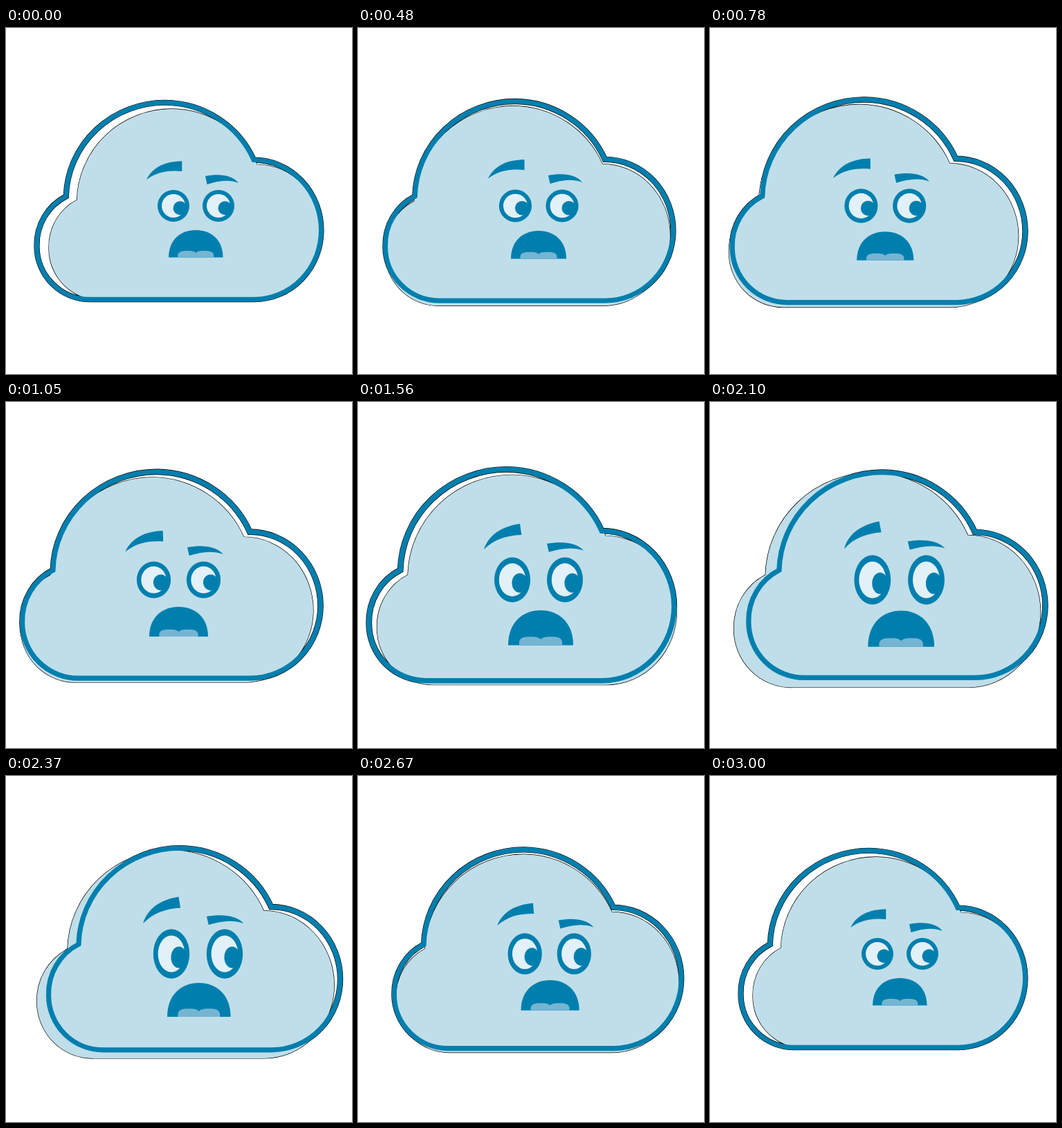
Recreate the animation shown at these times as an HTML page. Size 500 px wide and 500 px high, loop 3.03 s.

```html
<!DOCTYPE html>
<html lang="en">
<head>
<meta charset="utf-8">
<title>Worried cloud</title>
<style>
  html, body { margin: 0; width: 100%; height: 100%; overflow: hidden; background: #fff; }
  svg { display: block; width: 100vw; height: 100vh; }
  .ink { fill: #007fae; }
  .rim { fill: none; stroke: #000; }
</style>
</head>
<body>
<svg viewBox="0 0 500 500">
  <defs>
    <path id="cloud" d="M122 392A77 77 0 0 1 44.5 315A77 78 0 0 1 86.8 243
      A143.2 139 0 0 1 230 107.5A141.5 139 0 0 1 358 190.3
      A97.5 102 0 0 1 455.5 292A97 100 0 0 1 359 392Z"/>
    <g id="eye">
      <circle class="ink" r="23"/>
      <circle r="17" fill="#e2f0f7"/>
      <circle class="ink" cx="9.5" cy="3.2" r="10"/>
    </g>
  </defs>
  <g class="line"><use href="#cloud" class="rim" stroke-width="8.2"/></g>
  <g class="body">
    <use href="#cloud" class="rim" stroke-width="1.3"/>
    <use href="#cloud" fill="#bfdee9"/>
  </g>
  <g class="line"><use href="#cloud" fill="none" stroke="#007fae" stroke-width="7"/></g>
  <use id="eyeL" href="#eye"/>
  <use id="eyeR" href="#eye"/>
  <path id="browL" class="ink" d="M0 0C9 -18 27 -26.5 51.3 -26.5V-12C31 -14 15 -11 0 0Z"/>
  <path id="browR" class="ink" d="M0 0C19 -3.5 38 -2.5 48 10C33 4 18 7 2.5 12Z"/>
  <g id="mouth">
    <path class="ink" d="M-39.2 39.5C-39.2 14 -22 0 0 0S39.2 14 39.2 39.5Z"/>
    <path fill="#75b5d2" d="M-26 39.5V37C-26 31 -20 30 -13 30C-7 30 -3 30 0 33C3 30 7 30 13 30C20 30 26 31 26 37V39.5Z"/>
  </g>
</svg>
<script>
const STEP = 30, LOOP = 3030, SPAN = 3000;
const TIMES = [0, 480, 1050, 1560, 1830, 2370];

// Periodic monotone cubic through a few poses
function track(values, times = TIMES) {
  const n = values.length;
  const gap = i => (i === n - 1 ? SPAN : times[i + 1]) - times[i];
  const slope = i => (values[(i + 1) % n] - values[i]) / gap(i);
  const tangent = i => {
    const p = (i + n - 1) % n, a = slope(p), b = slope(i);
    if (a * b <= 0) return 0;
    const u = 2 * gap(i) + gap(p), v = gap(i) + 2 * gap(p);
    return (u + v) / (u / a + v / b);
  };
  return t => {
    let i = n - 1;
    while (times[i] > t) i--;
    const j = (i + 1) % n, h = gap(i), s = (t - times[i]) / h, r = 1 - s;
    return r * r * (1 + 2 * s) * values[i] + s * s * (3 - 2 * s) * values[j]
      + h * s * r * (r * tangent(i) - s * tangent(j));
  };
}

const lineX = track([250, 247.5, 239, 231.5, 236.3, 252.5, 275.5, 272.3],
  [0, 480, 1050, 1350, 1560, 1830, 2270, 2370]);
const lineW = track([411, 416, 431, 441, 436, 421.5]);
const bodyX = track([259, 245, 232.5, 244, 250, 259.5]);
const bodyY = track([255, 257, 257, 257, 257, 257.5]);
const bodyW = track([394, 412, 423, 433, 440, 443, 429.5],
  [0, 480, 1050, 1560, 1830, 2100, 2370]);

const faceX = track([274.5, 261.2, 249.5, 261, 267, 277.5]);
const eyeGap = track([32.5, 33.8, 36, 38, 39, 38.5]);
const eyeRx = track([23, 23.6, 24.6, 26, 26.5, 26.2]);
const eyeRy = track([23, 23.5, 26.5, 32.4, 35.7, 35.8]);
const browScale = track([1, 1.024, 1.08, 1.105, 1.12, 1.11]);
const browTilt = track([0, 0, -2, -8, -11.5, -9.5]);
const browLY = track([219, 217.5, 216.5, 213, 212, 213]);
const browRX = track([13.5, 13.8, 12.5, 12, 12, 12.5]);
const browRY = track([214, 213, 210, 204.8, 201, 203]);
const mouthX = track([274.3, 261, 249.5, 264, 271, 278.8]);
const mouthY = track([292, 293, 296, 301, 303, 299]);
const mouthW = track([39.2, 40, 42.5, 47, 49, 45.8]);
const mouthH = track([39.5, 40.5, 43, 50.4, 54, 49]);

const place = (sel, x, y, sx, sy = sx, rot = 0, tail = "") =>
  document.querySelectorAll(sel).forEach(el => el.setAttribute("transform",
    `translate(${x} ${y}) rotate(${rot}) scale(${sx} ${sy}) ${tail}`));

function draw(t) {
  const center = "translate(-250 -249.75)";
  const lw = lineW(t) / 411, bw = bodyW(t) / 411;
  place(".line", lineX(t), 250, lw, lw, 0, center);
  place(".body", bodyX(t), bodyY(t), bw, bw * 1.012, 0, center);

  const x = faceX(t), gap = eyeGap(t), k = browScale(t);
  const rx = eyeRx(t) / 23, ry = eyeRy(t) / 23;
  place("#eyeL", x - gap, 257, rx, ry);
  place("#eyeR", x + gap, 257, rx, ry);
  place("#browL", x - 71.5 * k, browLY(t), k, k, browTilt(t));
  place("#browR", x + browRX(t), browRY(t), k, 1);
  place("#mouth", mouthX(t), mouthY(t), mouthW(t) / 39.2, mouthH(t) / 39.5);
}

const start = performance.now();
function tick() {
  const t = (performance.now() - start) % LOOP;
  draw(Math.floor(t / STEP) * STEP % SPAN);
  requestAnimationFrame(tick);
}
tick();
</script>
</body>
</html>
```
